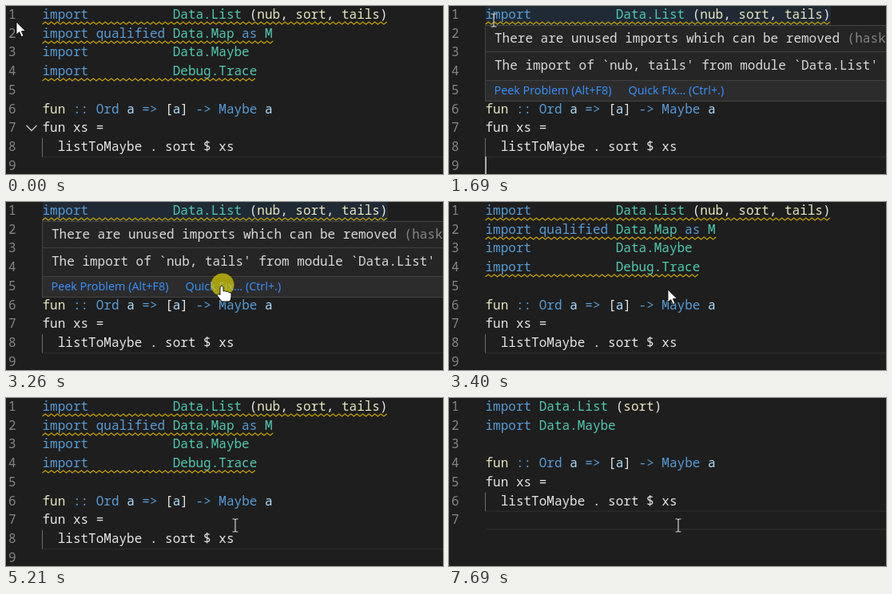
Recreate the animation shown at these times as an HTML page. Size 547x211 px, loop 8.23 s.

```html
<!DOCTYPE html>
<html lang="en">
<head>
<meta charset="utf-8">
<title>Removing unused imports</title>
<style>
  html, body { margin: 0; width: 100%; height: 100%; overflow: hidden; background: #1e1e1e; }
  svg { display: block; }
  text { font: 500 16px "Noto Sans Mono", monospace; fill: #dadada; white-space: pre; }
  .ui { font-family: "Open Sans", sans-serif; font-weight: 400; }
  .link { font-size: 14.4px; fill: #3794ff; }
  .wave { fill: none; stroke: #c4a000; stroke-width: 1.3; }
</style>
</head>
<body>
<svg id="stage" width="547" height="211" viewBox="0 0 547 211">
  <rect width="547" height="211" fill="#1e1e1e"/>
  <rect id="tint" x="46" y="0" width="432" height="24" fill="#202a34"/>
  <g id="before"></g>
  <g id="after"></g>
  <path id="fold" d="M25.5 150 L32 156.5 L38.5 150" fill="none" stroke="#c5c5c5" stroke-width="1.5"/>
  <g id="leftover"></g>
  <g id="stale"></g>
  <g id="dots" fill="#b8b8b8"></g>
  <rect id="caret" x="45" width="2" height="22.5" fill="#aeafad"/>

  <g id="hover">
    <rect x="45.5" y="24.5" width="510" height="95" fill="#252526" stroke="#454545"/>
    <rect x="46" y="94" width="502" height="25" fill="#2c2c2d"/>
    <path d="M46 57.5 H547 M46 93.5 H547" stroke="#404041"/>
    <text x="57" y="46">There are unused imports which can be removed <tspan fill="#858585">(haskell)</tspan></text>
    <text x="57" y="80">The import of `nub, tails' from module `Data.List' is redundant</text>
    <text class="ui link" x="56.5" y="111">Peek Problem (Alt+F8)</text>
    <text class="ui link" x="224.5" y="111">Quick Fix… (Ctrl+.)</text>
  </g>

  <g id="menu">
    <rect x="232" y="129" width="241" height="49" fill="#252526" style="filter:drop-shadow(0 2px 4px #000)"/>
    <rect x="233" y="138" width="239" height="31" fill="#094771"/>
    <text class="ui" x="265" y="160" style="font-size:15.3px;fill:#fff">Remove unused imports</text>
  </g>

  <g id="mouse">
    <circle id="click" r="14.5" fill="#e2d400" opacity=".68"/>
    <path id="arrow" d="M0 0 V16 L3.7 12.6 L6.3 18.6 L9 17.4 L6.4 11.6 H11.5 Z" fill="#fff" stroke="#000" stroke-width=".8"/>
    <path id="beam" d="M-3.5 -8 H-1 L0 -7 L1 -8 H3.5 M0 -7 V7 M-3.5 8 H-1 L0 7 L1 8 H3.5" fill="none" stroke="#d0d0d0" stroke-width="1.2"/>
    <path id="hand" transform="translate(-1 1)" d="M-2 1.5 Q0 -1.5 2 1.5 V7 Q4 5.6 5.4 7.6 Q7.6 6.4 8.8 8.6 Q11.6 8 12 10.5 V14 Q12 17 10 20 H0 Q-3 16 -5.6 12.6 Q-6 9.6 -2 11.5 Z" fill="#fff" stroke="#000" stroke-width=".9"/>
  </g>
</svg>
<script>
const LOOP = 8230, ROW = 23.7, LEFT = 45.5, CHAR = 9.6;
const $ = id => document.getElementById(id);

function add(parent, tag, attrs, content) {
  const node = document.createElementNS('http://www.w3.org/2000/svg', tag);
  for (const key in attrs) node.setAttribute(key, attrs[key]);
  if (content !== undefined) node.textContent = content;
  parent.append(node);
  return node;
}

// Markup: a one-letter colour key and a colon open each part, parts end with "|".
const COLORS = { k: '#569cd6', m: '#4ec9b0', f: '#e8e6c0', v: '#b0deff', p: '#e6e6e6' };
const BODY = [
  'f:fun|k: :: Ord |v:a|k: => |p:[|v:a|p:]|k: -> Maybe |v:a',
  'p:fun xs =',
  'p:  listToMaybe . sort $ xs',
  ''
];
const gap = ' '.repeat(11);
const OLD = [
  `k:import${gap}|m:Data.List |p:(|f:nub|p:, |f:sort|p:, |f:tails|p:)`,
  'k:import qualified |m:Data.Map |k:as |m:M',
  `k:import${gap}|m:Data.Maybe`,
  `k:import${gap}|m:Debug.Trace`,
  '', ...BODY
];
const NEW = ['k:import |m:Data.List |p:(|f:sort|p:)', 'k:import |m:Data.Maybe', '', ...BODY];

function drawCode(group, lines) {
  const last = lines.length - 1, top = last * ROW;
  add(group, 'path', { d: `M46 ${top} H547 M46 ${top + 22.7} H547`, stroke: '#2a2a2a', 'stroke-width': 1.6 });
  add(group, 'rect', { x: 45, y: top - ROW, width: 1, height: ROW, fill: '#6c6c6c' });
  lines.forEach((line, row) => {
    const y = Math.round(16 + row * ROW);
    add(group, 'text', { x: 3, y, style: 'fill:#858585;font-weight:400' }, row + 1);
    if (!line) return;
    const text = add(group, 'text', { x: LEFT, y });
    for (const part of line.split('|'))
      add(text, 'tspan', { style: `fill:${COLORS[part[0]]}` }, part.slice(2));
  });
}

function wave(group, row, from, to) {
  const y = 21.5 + Math.round(row * ROW), half = 3.75;
  let d = `M${from} ${y + 1.5}`;
  for (let i = 1; from + i * half <= to + 1; i++)
    d += ` L${from + i * half} ${y + (i % 2 ? -1.5 : 1.5)}`;
  add(group, 'path', { d, class: 'wave' });
}
const waveColumns = (group, row, count) => wave(group, row, LEFT, LEFT + count * CHAR);

drawCode($('before'), OLD);
drawCode($('after'), NEW);
[[0, 45], [1, 30], [3, 28]].forEach(([row, n]) => waveColumns($('before'), row, n));
[[0, 23], [1, 17], [3, 28]].forEach(([row, n]) => waveColumns($('stale'), row, n));
wave($('leftover'), 0, 267, 276);
wave($('leftover'), 1, 45.5, 54.5);
wave($('leftover'), 2, 45.5, 54.5);
for (const row of [0, 1, 3])
  for (let i = 0; i < 3; i++)
    add($('dots'), 'circle', { cx: 47 + i * 5, cy: 21 + row * ROW, r: 1.1 });

const BLINKS = [380, 920, 1380, 1920, 2390, 2900, 5270, 5760, 6220, 6770, 7230, 7690];
const MOVES = [
  { start: 1070, end: 1380, steps: 5, from: [13, 20], to: [56, 18] },
  { start: 2240, end: 2940, steps: 10, from: [56, 18], to: [271, 104] },
  { start: 3400, end: 3400, steps: 1, from: [271, 104], to: [274, 110] },
  { start: 4340, end: 4650, steps: 5, from: [274, 110], to: [285, 159], hold: true },
  { start: 5210, end: 5210, steps: 1, from: [285, 159], to: [287, 160] }
];

function mouseAt(t) {
  let pos = MOVES[0].from;
  for (const { start, end, steps, from, to, hold } of MOVES) {
    if (t < start) break;
    const spacing = (end - start) / Math.max(1, steps - 1) || 1;
    const done = Math.min(steps - 1, Math.floor((t - start) / spacing + .01));
    const p = hold ? done / (steps - 1) : (done + 1) / steps;
    const eased = p * p * (3 - 2 * p);
    pos = from.map((a, i) => a + (to[i] - a) * eased);
  }
  return pos;
}

const show = (id, on) => $(id).setAttribute('visibility', on ? 'visible' : 'hidden');
const within = (t, a, b) => t >= a && t < b;

function render(t) {
  const edited = t >= 5270;
  show('before', !edited);
  show('after', edited);
  show('fold', t < 1610);
  $('fold').setAttribute('opacity', t < 1300 ? 1 : t < 1380 ? .5 : .06);
  show('tint', within(t, 1610, 3400));
  show('hover', within(t, 1610, 3400));
  $('hover').setAttribute('opacity', t < 1690 ? .6 : 1);
  show('menu', within(t, 3490, 5210));
  show('leftover', within(t, 5270, 6450));
  show('stale', within(t, 6450, 6530));
  show('dots', within(t, 6450, 7230));

  show('caret', BLINKS.filter(b => b <= t).length % 2);
  $('caret').setAttribute('y', (edited ? 6 : 8) * ROW - .4);

  const [x, y] = mouseAt(t);
  $('mouse').setAttribute('transform', `translate(${x.toFixed(2)} ${y.toFixed(2)})`);
  const hand = within(t, 2780, 3400);
  const arrow = t < 1300 || within(t, 3400, 5210);
  show('hand', hand);
  show('arrow', arrow);
  show('beam', !hand && !arrow);
  show('click', within(t, 3260, 3400) || within(t, 5040, 5210));
}

const begin = performance.now();
function tick() {
  render((performance.now() - begin) % LOOP);
  requestAnimationFrame(tick);
}
render(0);
requestAnimationFrame(tick);
</script>
</body>
</html>
```
